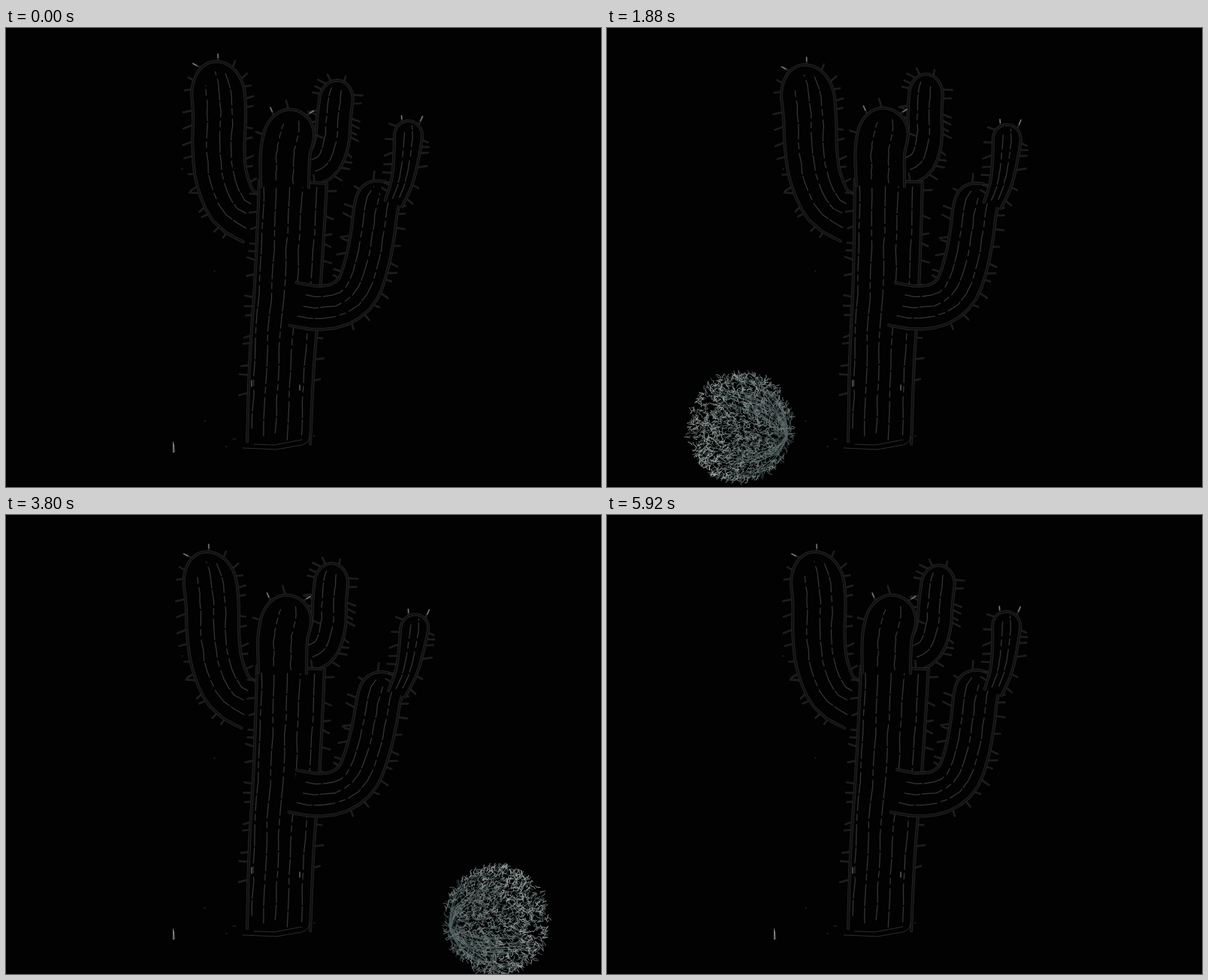
An HTML page with a canvas that plays this animation: 792x612 px, repeating every 5.96 s.

```html
<!DOCTYPE html>
<html lang="en">
<head>
<meta charset="utf-8">
<title>Desert night</title>
<style>
html, body { margin: 0; width: 100%; height: 100%; overflow: hidden; background: #020202; }
canvas { display: block; }
</style>
</head>
<body>
<canvas id="stage" width="792" height="612"></canvas>
<script>
const LOOP = 5960, STEP = 40, TURN = Math.PI * 2, NIGHT = '#020202';
const ctx = document.getElementById('stage').getContext('2d');

// Tip motion: two slow swings per loop around mid, plus a vertical drop and tilt
const sway = {
  trunk: { mid: -5, amp: 6.5, lag: 120, drop: -2, tilt: 0 },
  left: { mid: -11, amp: 8, lag: 0, drop: 4.5, tilt: 0, from: 285, to: 45 },
  top: { mid: -8, amp: 9.5, lag: 120, drop: -3, tilt: 0.33, from: 215, to: 70 },
  right: { mid: 0, amp: 9, lag: 930, drop: 6, tilt: 0.3, from: 390, to: 124 }
};

// Centre lines from root to tip, half widths at both ends, rounded cap length, folds across the width
const limbs = [
  { part: 'left', line: [[333, 257], [303, 238], [287, 200], [283, 160], [284, 115], [282, 85], [275, 45]],
    width: [33, 36], cap: 48, folds: [-0.45, 0.05, 0.5], gap: 19, bare: 25 },
  { part: 'top', line: [[398, 190], [421, 180], [433, 155], [437, 115], [443, 70]],
    width: [23, 22], cap: 26, folds: [-0.45, 0.25], gap: 15, bare: 30 },
  { part: 'trunk', line: [[363, 553], [367, 450], [375, 340], [380, 250], [382, 205]],
    width: [42, 45], cap: 0, folds: [-0.85, -0.48, -0.1, 0.28, 0.7], gap: 22, bare: 65 },
  { part: 'trunk', line: [[371, 212], [372, 165], [378, 138], [382, 109]],
    width: [32, 34], cap: 38, folds: [-0.35, 0.35], gap: 22, bare: 70 },
  { part: 'right', line: [[382, 368], [415, 373], [445, 368], [467, 350], [480, 315], [488, 275], [493, 238], [503, 205]],
    width: [29, 29], cap: 30, folds: [-0.5, 0, 0.5], gap: 18, bare: 60 },
  { part: 'right', line: [[516, 234], [527, 205], [533, 170], [537, 124]],
    width: [12, 20], cap: 22, folds: [-0.3, 0.3], gap: 16, bare: 12 }
];

// Tumbleweed: [time, x, y, degrees]
const roll = [[480, -112, 500, -280], [960, -13, 515, -180], [1880, 177, 532, 12],
  [3240, 513, 519, 380], [4400, 805, 572, 692], [4800, 905, 590, 800]];

function seeded(s) {
  return () => {
    s = (s * 1664525 + 1013904223) >>> 0;
    return s / 4294967296;
  };
}

// Smooth interpolation through rows of [position, ...values]
function sample(rows, t) {
  const n = rows.length - 1;
  let i = 0;
  while (i < n - 1 && t >= rows[i + 1][0]) i++;
  const a = rows[i], b = rows[i + 1], span = b[0] - a[0];
  const p = rows[Math.max(0, i - 1)], q = rows[Math.min(n, i + 2)];
  const u = Math.min(1, Math.max(0, (t - a[0]) / span)), u2 = u * u, u3 = u2 * u;
  return a.slice(1).map((v, k) => {
    const j = k + 1;
    const m0 = (b[j] - p[j]) / (b[0] - p[0]) * span;
    const m1 = (q[j] - v) / (q[0] - a[0]) * span;
    return (2 * u3 - 3 * u2 + 1) * v + (u3 - 2 * u2 + u) * m0 + (3 * u2 - 2 * u3) * b[j] + (u3 - u2) * m1;
  });
}

// Turn a limb's centre line into outline, creases, thorns and glints
function grow({ part, line, width, cap, folds, gap, bare }, index) {
  const rnd = seeded(index * 977 + 5);
  let total = 0;
  const rows = line.map(([x, y], i) => {
    if (i) total += Math.hypot(x - line[i - 1][0], y - line[i - 1][1]);
    return [total, x, y];
  });

  const across = (d, f) => {
    const [x, y] = sample(rows, d), a = sample(rows, d - 1), b = sample(rows, d + 1);
    const dx = b[0] - a[0], dy = b[1] - a[1], len = Math.hypot(dx, dy);
    const k = Math.max(0, d - total + cap) / (cap || 1);
    const w = f * (width[0] + (width[1] - width[0]) * d / total) * Math.sqrt(Math.max(0, 1 - k * k));
    return [x - dy / len * w, y + dx / len * w];
  };

  const n = 36, side = f => Array.from({ length: n + 1 }, (_, k) => across(total * (1 - (1 - k / n) ** 2), f));
  const outline = [...side(-1), ...side(1).reverse()];

  const creases = folds.map(f => {
    const start = 4 + rnd() * 14, end = total - cap * (0.25 + rnd() * 0.5);
    return Array.from({ length: 16 }, (_, k) => across(start + (end - start) * k / 15, f + (rnd() - 0.5) * 0.05));
  });

  const length = outline.reduce((sum, p, i) => i ? sum + Math.hypot(p[0] - outline[i - 1][0], p[1] - outline[i - 1][1]) : 0, 0);
  const thorns = [], glints = [];
  let walked = 0, next = bare;
  for (let i = 1; i < outline.length; i++) {
    const [ax, ay] = outline[i - 1], [bx, by] = outline[i];
    const dx = bx - ax, dy = by - ay, len = Math.hypot(dx, dy);
    while (len && next < walked + len && next < length - bare) {
      const u = (next - walked) / len, x = ax + dx * u, y = ay + dy * u;
      const reach = 8 + rnd() * 5, lean = (rnd() - 0.5) * 0.9;
      const tip = [x + (dy / len + dx / len * lean) * reach, y + (dy / len * lean - dx / len) * reach];
      thorns.push([[x, y], tip]);
      if (cap && Math.abs(next - length / 2) < cap * 0.9 && rnd() < 0.4) {
        glints.push([[(x + tip[0]) / 2, (y + tip[1]) / 2], tip]);
      }
      next += gap * (0.4 + rnd() * 1.1);
    }
    walked += len;
  }
  return { part, outline, creases, thorns, glints };
}

const cactus = limbs.map(grow);

const rise = (y, from, to, power) => Math.min(1, Math.max(0, (from - y) / (from - to))) ** power;

function tipShift({ mid, amp, lag, drop, tilt }, t) {
  const settle = Math.sin(Math.min(1, t / 500) * TURN / 4);
  const dx = settle * (mid + amp * Math.cos(TURN * 2 * (t - lag) / LOOP));
  return [dx, settle * drop + tilt * dx];
}

function bender(part, t) {
  const { from, to } = sway[part];
  const [tx, ty] = tipShift(sway.trunk, t), [ax, ay] = tipShift(sway[part], t);
  return ([x, y]) => {
    const w = rise(y, 560, 108, 1.5), v = from ? rise(y, from, to, 1.2) : 0;
    return [x + tx * w + (ax - tx) * v, y + ty * w + (ay - ty) * v];
  };
}

function trace(lines, bend) {
  const path = new Path2D();
  for (const line of lines) {
    line.forEach((p, i) => path[i ? 'lineTo' : 'moveTo'](...bend(p)));
  }
  return path;
}

function ink(path, color, width, dash = []) {
  ctx.strokeStyle = color;
  ctx.lineWidth = width;
  ctx.setLineDash(dash);
  ctx.stroke(path);
}

function drawCactus(t) {
  for (const { part, outline, creases, thorns, glints } of cactus) {
    const bend = bender(part, t);
    const body = trace([outline], bend), hairs = trace(thorns, bend);
    ctx.fillStyle = NIGHT;
    ctx.fill(body);
    ink(trace(creases, bend), '#353537', 1.3, [20, 3, 28, 6, 8, 5]);
    ink(body, '#262628', 4);
    ink(hairs, '#262628', 2.4);
    ink(body, '#111113', 2.4);
    ink(hairs, '#171719', 1);
    ink(trace(glints, bend), '#858585', 1.2);
  }
}

function drawGround() {
  ink(new Path2D('M405 545Q402 556 388 557L360 562L315 560M330 555L357 556L394 549M302 548h4'), '#2d2d2f', 1);
  ink(new Path2D('M222.6 552v14l1.6 -1l-.8 -10M327 470v8M391 476v7'), '#8c8c8c', 1);
  ink(new Path2D('M234 188h1M277 324h1M264 524h1M293 558h1M410 544h1'), '#29292b', 1.4);
}

// Twigs point away from a root on the rim and thin out toward the far side
const tones = ['#364141', '#526060', '#75827f', '#a5adac'];
const weed = (() => {
  const rnd = seeded(71), root = 64, paths = tones.map(() => new Path2D());
  const spread = () => rnd() - 0.5;
  for (let i = 0; i < 44; i++) {
    const a = spread() * 5, r = 66 * (0.5 + rnd() * 0.5);
    const y = Math.sin(a) * r;
    paths[i % 2].moveTo(root, spread() * 8);
    paths[i % 2].quadraticCurveTo(42 + rnd() * 16, y * (0.7 + rnd() * 0.4), Math.cos(a) * r, y);
  }
  for (let i = 0; i < 2300; i++) {
    const a = rnd() * TURN, r = 72 * Math.sqrt(rnd());
    let x = Math.cos(a) * r * 0.95, y = Math.sin(a) * r;
    const far = Math.hypot(x - root, y) / 132;
    if (rnd() < 0.5 * far * far) continue;
    let heading = Math.atan2(y, x - root) + spread() * 2.6;
    const path = paths[Math.min(3, Math.floor(far * 1.6 + rnd() * 2.3))];
    path.moveTo(x, y);
    for (let k = 0; k < 3; k++) {
      const step = 1 + rnd() * 2;
      path.lineTo(x += Math.cos(heading) * step, y += Math.sin(heading) * step);
      heading += spread() * 2;
    }
  }
  return paths;
})();

function drawWeed(t) {
  if (t < roll[0][0] || t > roll[roll.length - 1][0]) return;
  const [x, y, deg] = sample(roll, t);
  ctx.save();
  ctx.translate(x, y);
  ctx.rotate(deg * Math.PI / 180);
  ctx.fillStyle = NIGHT;
  ctx.beginPath();
  ctx.arc(0, 0, 66, 0, TURN);
  ctx.fill();
  weed.forEach((path, i) => ink(path, tones[i], 0.85));
  ctx.restore();
}

function render(t) {
  ctx.fillStyle = NIGHT;
  ctx.fillRect(0, 0, 792, 612);
  drawCactus(t);
  drawGround();
  drawWeed(t);
}

const began = performance.now();
function tick() {
  const t = Math.floor((performance.now() - began) % LOOP / STEP) * STEP;
  render(t < 2 * STEP ? 0 : t);
  requestAnimationFrame(tick);
}
ctx.lineCap = 'round';
ctx.lineJoin = 'round';
tick();
</script>
</body>
</html>
```
